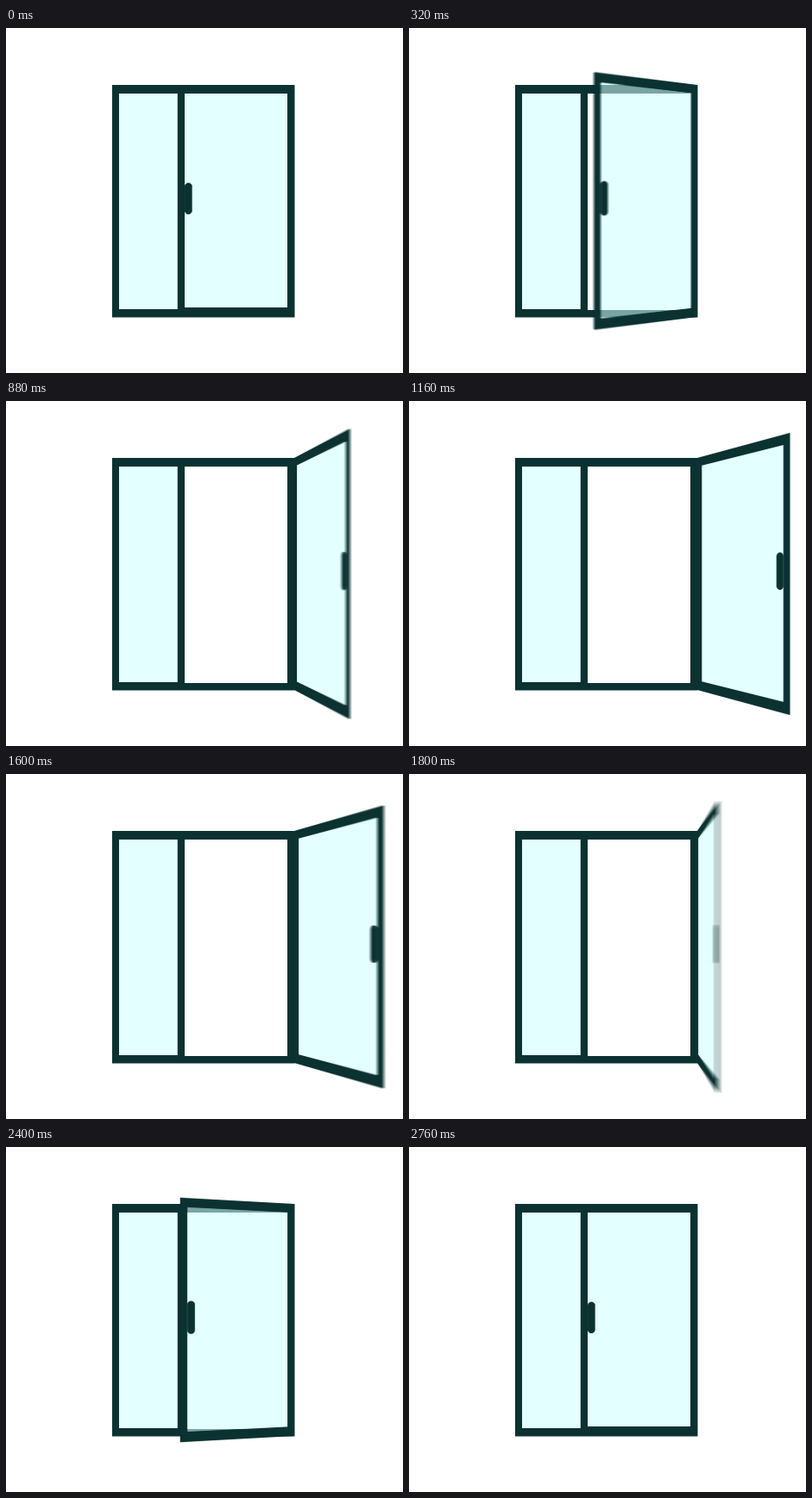
Write an HTML page with a canvas that moves like this. It is 460 px wide and 400 px high and loops after 2.88 s.

```html
<!DOCTYPE html>
<html lang="en">
<head>
<meta charset="utf-8">
<title>Swinging glass door</title>
<style>
html, body { margin: 0; width: 100%; height: 100%; overflow: hidden; background: #fff; }
canvas { display: block; }
</style>
</head>
<body>
<canvas id="stage" width="460" height="400"></canvas>
<script>
const FRAME = '#0b3231', PANE = '#e3ffff', GLASS = 'rgba(206,255,255,.56)';
const HINGE = 334, EYE_X = 229, EYE_Y = 200.4, DEPTH = 650;
const MAX_ANGLE = 124 * Math.PI / 180;
const STEP = 40, LOOP = 2880, HALF = 1440, REST = 120, SWING = 1200;
const SHUTTER = 20, SAMPLES = 16;

const out = document.getElementById('stage').getContext('2d');
const layer = document.createElement('canvas');
layer.width = 460;
layer.height = 400;
const g = layer.getContext('2d');

const box = (l, t, r, b) => [[l, t], [r, t], [r, b], [l, b]];

function fill(color, ...shapes) {
  g.fillStyle = color;
  g.beginPath();
  for (const shape of shapes) {
    shape.forEach(([x, y], i) => i ? g.lineTo(x, y) : g.moveTo(x, y));
    g.closePath();
  }
  g.fill('evenodd');
}

// Upright rounded bar
function bar(l, t, r, b) {
  const rad = (r - l) / 2, points = [];
  for (let i = 0; i < 24; i++) {
    const a = (i + .5) / 24 * 2 * Math.PI;
    points.push([l + rad + rad * Math.cos(a), (a < Math.PI ? b - rad : t + rad) + rad * Math.sin(a)]);
  }
  return points;
}

// Turn a shape about the hinge and project it
function turn(shape, angle) {
  return shape.map(([x, y]) => {
    const u = HINGE - x, s = DEPTH / (DEPTH - u * Math.sin(angle));
    return [EYE_X + (HINGE - u * Math.cos(angle) - EYE_X) * s, EYE_Y + (y - EYE_Y) * s];
  });
}

const wall = box(123, 66, 334.5, 335.5);
const panel = box(131, 76, 198.5, 326);
const opening = box(207, 76, 326, 327);
const door = box(199, 66, HINGE, 335);
const pane = box(207, 76, 326, 324);
const handle = bar(207, 179.5, 215.7, 216);

function scene(angle) {
  g.fillStyle = '#fff';
  g.fillRect(0, 0, 460, 400);
  fill(FRAME, wall, panel, opening);
  fill(PANE, panel);
  const glass = turn(pane, angle);
  fill(GLASS, glass);
  fill(FRAME, turn(door, angle), glass);
  fill(FRAME, turn(handle, angle));
}

const bezier = (s, a, b) => 3 * (1 - s) * (1 - s) * s * a + 3 * (1 - s) * s * s * b + s * s * s;

// Nearly linear start, soft landing
function ease(x) {
  let lo = 0, hi = 1;
  for (let i = 0; i < 24; i++) {
    const mid = (lo + hi) / 2;
    if (bezier(mid, .167, .55) < x) lo = mid; else hi = mid;
  }
  return bezier(lo, .167, 1);
}

function draw(now) {
  const time = Math.floor(now / STEP) * STEP;
  const phase = (time + LOOP - REST) % LOOP;
  const closing = phase >= HALF, local = phase % HALF;
  const moving = local > 0 && local < SWING;
  const count = moving ? SAMPLES : 1;
  for (let i = 0; i < count; i++) {
    const shift = moving ? ((i + .5) / count - .5) * SHUTTER : 0;
    const x = Math.min(1, Math.max(0, (local + shift) / SWING));
    const p = x === 0 || x === 1 ? x : ease(x);
    scene(MAX_ANGLE * (closing ? 1 - p : p));
    // Running average of the exposures
    out.globalAlpha = 1 / (i + 1);
    out.drawImage(layer, 0, 0);
  }
}

function tick() {
  draw(performance.now());
  requestAnimationFrame(tick);
}
tick();
</script>
</body>
</html>
```
